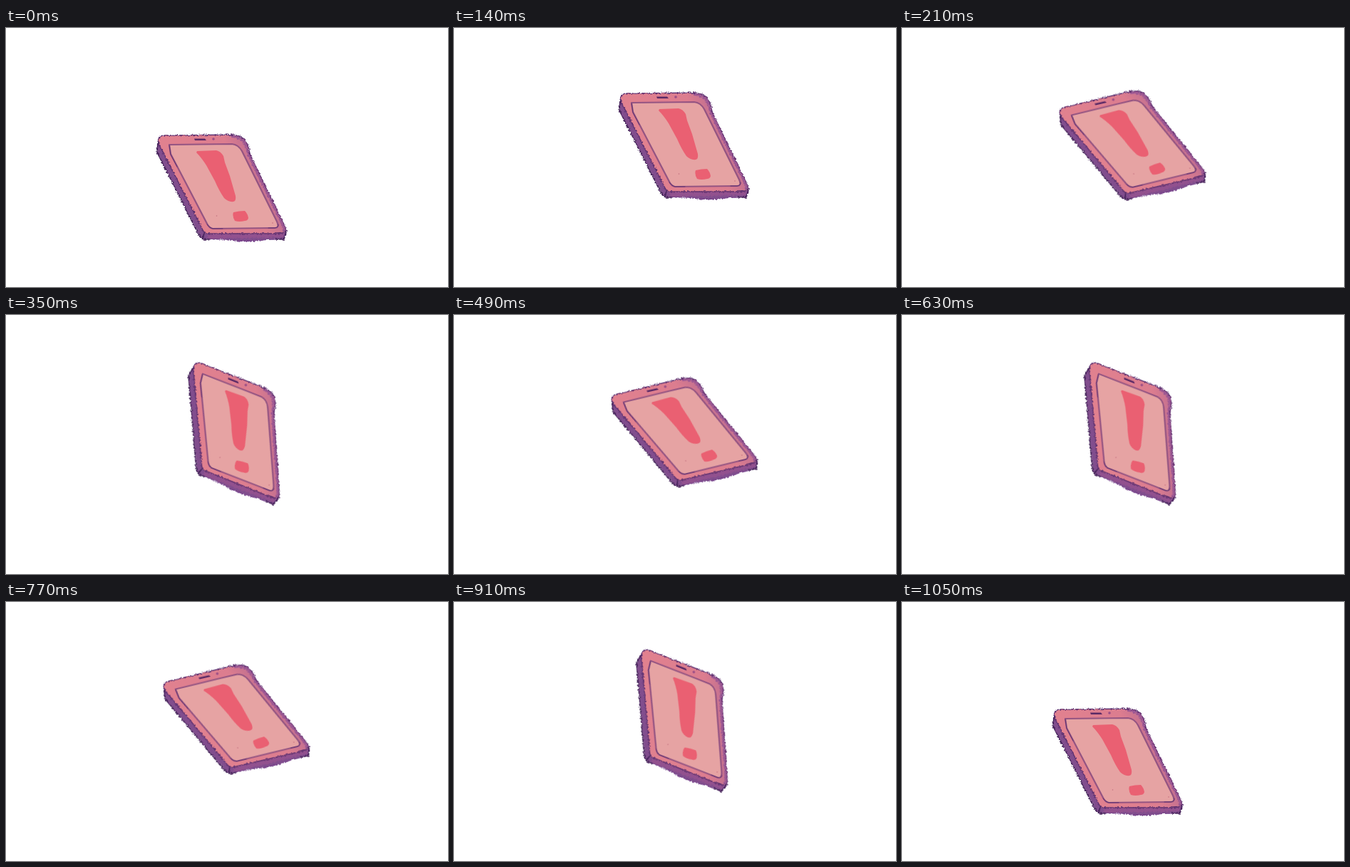
Write an HTML page that moves like this. It is 620 by 364 pixels and loops after 1190 ms.

```html
<!DOCTYPE html>
<html lang="en">
<head>
<meta charset="utf-8">
<title>Alert phone</title>
<style>
  html, body { margin: 0; width: 100%; height: 100%; overflow: hidden; background: #fff; }
  svg { display: block; width: 620px; height: 364px; }
  #phone { transform-box: view-box; transform-origin: 300px 222px; }
  path { stroke-linejoin: round; stroke-linecap: round; }
  .line { fill: none; stroke: #5f3170; }
</style>
</head>
<body>
<svg viewBox="0 0 620 364">
  <defs>
    <filter id="crayon" filterUnits="userSpaceOnUse" x="195" y="135" width="215" height="180" color-interpolation-filters="sRGB">
      <feTurbulence type="fractalNoise" baseFrequency=".38" numOctaves="2" seed="7"/>
      <!-- opaque noise keeps the displacement centred -->
      <feColorMatrix values="1 0 0 0 0  0 1 0 0 0  0 0 1 0 0  0 0 0 0 1" result="noise"/>
      <feDisplacementMap in="SourceGraphic" in2="noise" scale="4" xChannelSelector="R" yChannelSelector="G"/>
    </filter>
    <filter id="soft" filterUnits="userSpaceOnUse" x="195" y="135" width="215" height="180" color-interpolation-filters="sRGB">
      <feGaussianBlur stdDeviation=".6"/>
    </filter>
    <linearGradient id="rim" gradientUnits="userSpaceOnUse" x1="225" y1="220" x2="352" y2="163">
      <stop offset="0" stop-color="#e2828f"/>
      <stop offset=".72" stop-color="#dc7d8f"/>
      <stop offset="1" stop-color="#b86a90"/>
    </linearGradient>
  </defs>

  <g id="phone">
    <g filter="url(#crayon)">
      <!-- thickness of the body -->
      <path fill="#814d8d" d="M213 156 L217 151 L280 285 L393 284 L394 288 L390 297 Q368 297 352 299 Q328 301 308 297 L276 297 Q272 292 269 286 L212 175 Z"/>
      <path fill="#a4568f" d="M282 290 L391 288 L388 294 L284 296 Z" opacity=".5"/>
      <!-- face -->
      <path fill="url(#rim)" d="M215 155 Q217 151 224 151 L319 150 Q330 151 336 159 Q341 166 342 177 L387 270 Q392 280 393 285 Q388 289 380 289 L280 289 Q277 287 275 282 L217 167 Q214 161 215 155 Z"/>
      <path fill="none" stroke="#9d5893" stroke-width="4" d="M318 152 Q329 153 335 161 Q339 167 340 177 L385 269 Q389 277 391 284"/>
      <path class="line" stroke-width="1.5" d="M214 157 Q215 151 223 151 L319 150 Q331 151 337 160 Q341 167 342 177"/>
      <path class="line" stroke-width="1.1" d="M342 177 L387 270 Q392 279 393 285"/>
      <path class="line" stroke-width="1.6" d="M214 157 Q213 164 218 170 L276 284 Q278 288 283 289 L380 289 Q389 289 393 285"/>
      <path class="line" stroke-width="1.6" style="stroke:#45235a" d="M213 160 L212 175 L268 286 Q272 293 276 297 L286 297 M278 288 L276 296 M393 286 L390 297 L378 297"/>
      <path class="line" stroke-width="1.2" style="stroke:#74408a" d="M286 297 L308 297 Q328 301 352 299 Q368 297 378 297"/>
    </g>

    <!-- screen -->
    <path fill="#e6a3a3" stroke="#945482" stroke-width="2.2" filter="url(#soft)" d="M229 164 L317 163 Q326 164 331 173 L380 272 Q384 281 377 281 L290 282 Q285 281 282 275 L231 177 Z"/>
    <path class="line" stroke-width="1" d="M229 165 L231 178 L240 195 M282 276 Q285 281 290 282 L304 282 M368 281 L377 281 Q383 280 382 276"/>
    <path fill="#5b2a66" d="M264 155.5 L279 155.5 L281 158 L265 158 Z"/>
    <circle cx="291" cy="156" r="1.8" fill="#9a4d86"/>

    <!-- exclamation mark -->
    <g fill="#ea6072" filter="url(#soft)">
      <path d="M268 173 L295 172 Q301 173 305 180 L307 189 L314 208 L322 236 Q323 243 319 244 Q312 245 306 239 Q299 229 293 215 L281 193 Q274 182 267 175 Z"/>
      <path d="M319 259 Q327 257 335 257 Q339 261 340 267 Q339 271 335 271 Q327 273 321 271 Q317 264 319 259 Z"/>
    </g>
    <g fill="#c4707f">
      <circle cx="295.5" cy="264" r=".8"/>
      <circle cx="374" cy="274" r=".8"/>
    </g>
  </g>
</svg>
<script>
  const LOOP = 1190;
  const lift = deg => `translate(20px, -59px) rotate(${deg}deg)`;
  const rest = 'translate(0px, 0px) rotate(0deg)';
  const left = lift(-13), right = lift(22);

  // [start in ms, pose]; each pose holds until the next one
  const steps = [
    [0, rest], [140, lift(0)], [210, left], [350, right], [490, left],
    [630, right], [770, left], [910, right], [1050, rest], [LOOP, rest]
  ];

  document.getElementById('phone').animate(
    steps.map(([ms, transform]) => ({ offset: ms / LOOP, transform, easing: 'steps(1, end)' })),
    { duration: LOOP, iterations: Infinity }
  );
</script>
</body>
</html>
```
